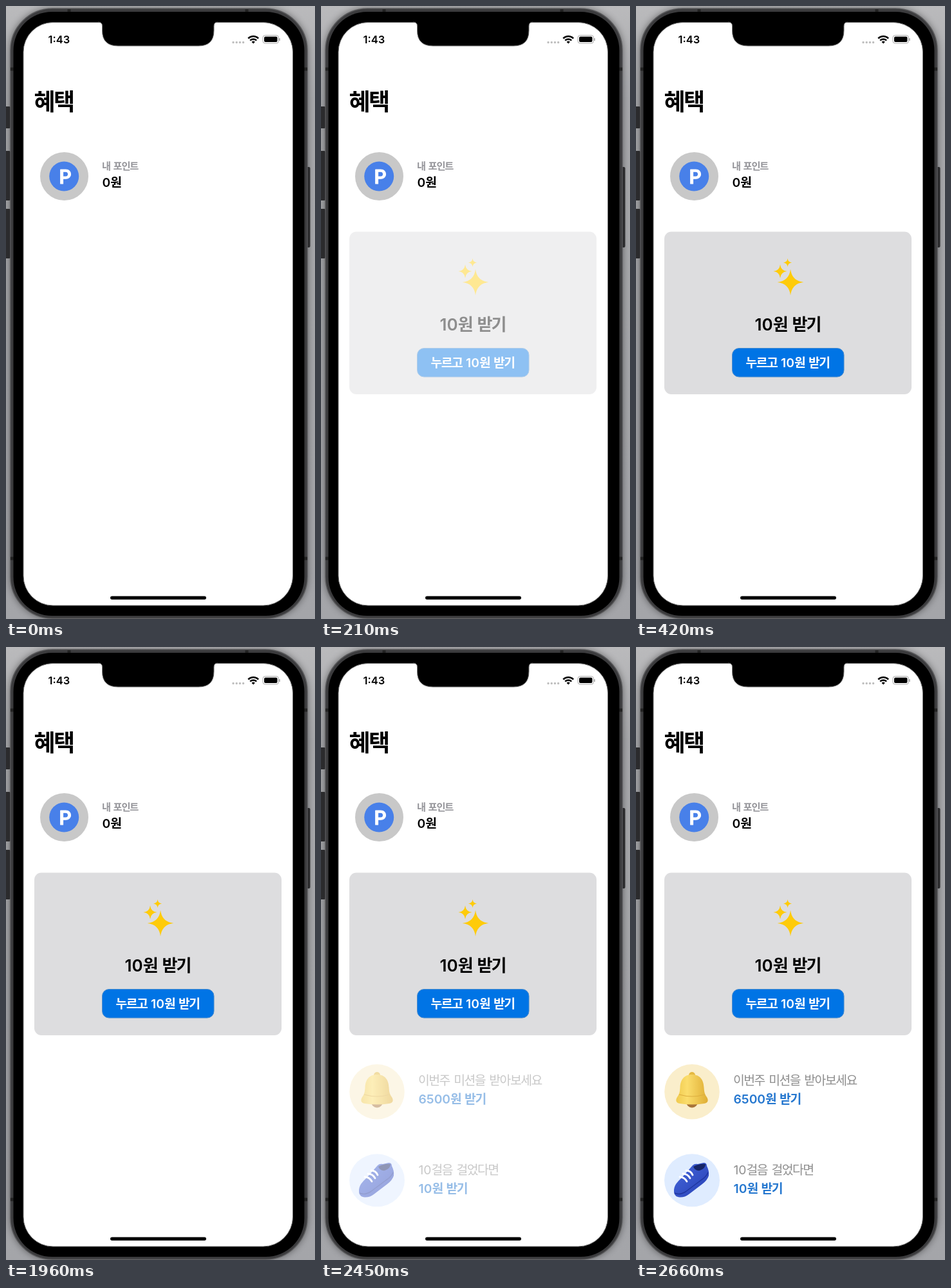
An HTML page that plays this animation: 480 by 952 pixels, repeating every 3.22 s.

```html
<!DOCTYPE html>
<html lang="ko">
<head>
<meta charset="utf-8">
<title>혜택</title>
<style>
  html, body { margin: 0; width: 100%; height: 100%; overflow: hidden; background: #a3a4a7; }
  svg { display: block; width: 100%; height: 100%; }
  text { font: 600 19.3px Inter, "Noto Sans CJK KR", sans-serif; }
  tspan { letter-spacing: -.075em; word-spacing: .12em; }
  .mid { text-anchor: middle; }
  .note { font-weight: 400; fill: #8e8e8e; }
  .link { fill: #2577cf; }
  .soft { stroke: #777; stroke-width: 1; }
</style>
</head>
<body>
<svg viewBox="0 0 480 952">
  <defs>
    <linearGradient id="wall" x2="0" y2="1">
      <stop stop-color="#bababc"/><stop offset=".15" stop-color="#a8a9ac"/><stop offset="1" stop-color="#a4a5a9"/>
    </linearGradient>
    <linearGradient id="gold">
      <stop stop-color="#f0ca4e"/><stop offset=".35" stop-color="#fbdd6c"/><stop offset="1" stop-color="#dfae35"/>
    </linearGradient>
    <linearGradient id="blue" x2="1" y2="1">
      <stop stop-color="#4668dc"/><stop offset="1" stop-color="#263fb4"/>
    </linearGradient>
    <filter id="blur"><feGaussianBlur stdDeviation="6"/></filter>
    <path id="star" d="M0-1Q.1-.1 1 0Q.1.1 0 1Q-.1.1-1 0Q-.1-.1 0-1Z"/>
  </defs>

  <!-- phone -->
  <rect width="480" height="952" fill="url(#wall)"/>
  <rect x="7" y="4" width="461" height="947" rx="65" opacity=".5" filter="url(#blur)"/>
  <g fill="#2b2b2d">
    <rect x="-3" y="156" width="10" height="34" rx="2"/>
    <rect x="-3" y="225" width="10" height="77" rx="2"/>
    <rect x="-3" y="315" width="10" height="77" rx="2"/>
    <rect x="465" y="250" width="7.5" height="125" rx="2"/>
  </g>
  <rect x="7" y="4" width="461" height="947" rx="65" fill="#3b3b3d" stroke="#565658" stroke-width="1.5"/>
  <path d="M7 98h5M463 98h5M7 858h5M463 858h5M98 5v4M374 5v4" stroke="#222" stroke-width="5"/>
  <rect x="11.5" y="9" width="452" height="938" rx="60"/>
  <rect class="soft" x="27" y="25.5" width="418.5" height="905.5" rx="46" fill="#fff"/>
  <path class="soft" d="M143 25Q149.5 25 149.5 31V38Q149.5 62 174 62H299Q323 62 323 38V31Q323 25 329 25"/>
  <rect x="162" y="916.5" width="149" height="5.2" rx="2.6"/>

  <!-- status bar -->
  <text x="65.5" y="58" style="font-size:16.5px">1:43</text>
  <path d="M353 56.5h.01M358.2 56.5h.01M363.4 56.5h.01M368.6 56.5h.01" stroke="#bebebe" stroke-width="3.4" stroke-linecap="round"/>
  <path d="M376.3 50.3a11 11 0 0 1 15.8 0M379.2 53.5a7 7 0 0 1 10 0" fill="none" stroke="#000" stroke-width="2.5"/>
  <path d="M384.2 58.5l-2.6-2.7a3.7 3.7 0 0 1 5.2 0Z"/>
  <rect x="399" y="45.5" width="24.5" height="12.5" rx="3.6" fill="#fff" stroke="#aaa"/>
  <rect x="401" y="47.5" width="20.5" height="8.5" rx="2"/>
  <path d="M425 50v4" stroke="#aaa" stroke-width="1.5"/>

  <!-- header -->
  <text x="43.5" y="161.5" style="font-size:36px">혜택</text>
  <circle cx="90.5" cy="264.5" r="37.5" fill="#c8c8c8"/>
  <circle cx="90.2" cy="264.5" r="23" fill="#4880e9"/>
  <text class="mid" x="92.3" y="276" fill="#fff" stroke="#fff" stroke-linejoin="round" style="font-size:30px">P</text>
  <text x="149" y="254" fill="#95959a" style="font-size:15.3px">내 포인트</text>
  <text x="149.5" y="281">0원</text>

  <g id="card">
    <rect x="44" y="350.5" width="384" height="252.5" rx="11" fill="#dddddf"/>
    <g fill="#fecb0a">
      <use href="#star" transform="translate(240 429) scale(20.5)"/>
      <use href="#star" transform="translate(224 412) scale(10.5)"/>
      <use href="#star" transform="translate(235.5 398.5) scale(6.5)"/>
    </g>
    <text class="mid" x="235.5" y="503.5" style="font-size:26px">10원 받기</text>
    <rect x="149.5" y="531.5" width="173.5" height="44.5" rx="10.5" fill="#0074e5" stroke="#4a8ccd"/>
    <text class="mid" x="235.5" y="560.5" fill="#fff">누르고 10원 받기</text>
  </g>

  <g id="list">
    <circle cx="87" cy="690.7" r="42.8" fill="#faeecb"/>
    <circle cx="87" cy="706.5" r="9" fill="#a8743a"/>
    <circle cx="87" cy="665" r="5" fill="#e5b941"/>
    <path d="M87 664C74 664 69 673 68.5 684C68 692 67 695 64 699C61 704 62 708 68 709Q87 712 106 709C112 708 113 704 110 699C107 695 106 692 105.5 684C105 673 100 664 87 664Z" fill="url(#gold)"/>
    <path d="M67 695Q87 701 107 695" fill="none" stroke="#dcae3f" stroke-width="1.2"/>
    <text class="note" x="151" y="679.5">이번주 미션을 받아보세요</text>
    <text class="link" x="151.5" y="708.5">6500원 받기</text>

    <ellipse cx="87" cy="828.3" rx="43" ry="41" fill="#dfecff"/>
    <path d="M59 843C60 833 67 829 73 822L88 805Q91 802 96 803L105 801Q110 801 110 806Q114 814 113 821Q111 828 103 834L82 850Q74 856 65 854Q58 852 59 843Z" fill="url(#blue)"/>
    <path d="M60 848Q67 852 77 846L101 828Q109 823 112 816" fill="none" stroke="#1f369f" stroke-width="1.5"/>
    <path d="M89 807Q99 802 108 803Q108 810 99 813Q92 814 89 807Z" fill="#162566"/>
    <path d="M68 823q7 0 11 7M73 818q7 0 11 7M78 813q7 0 10 7" fill="none" stroke="#fff" stroke-width="2.8" stroke-linecap="round"/>
    <text class="note" x="151.5" y="819">10걸음 걸었다면</text>
    <text class="link" x="151.5" y="848">10원 받기</text>
  </g>
</svg>
<script>
  const LOOP = 3220, STEP = 70;
  const card = document.getElementById('card');
  const list = document.getElementById('list');

  // Tighter spacing for Hangul only
  for (const el of document.querySelectorAll('text'))
    el.innerHTML = el.textContent.replace(/[가-힣 ]+/g, '<tspan>$&</tspan>');

  const progress = (t, start, length) => Math.min(1, Math.max(0, (t - start) / length));
  const easeOut = u => 1 - (1 - u) ** 2;
  const easeInOut = u => u * u * (3 - 2 * u);

  function draw() {
    const t = Math.floor(performance.now() % LOOP / STEP) * STEP;
    card.setAttribute('opacity', easeOut(progress(t, 140, 280)));
    list.setAttribute('opacity', easeInOut(progress(t, 2290, 330)));
    requestAnimationFrame(draw);
  }
  draw();
</script>
</body>
</html>
```
